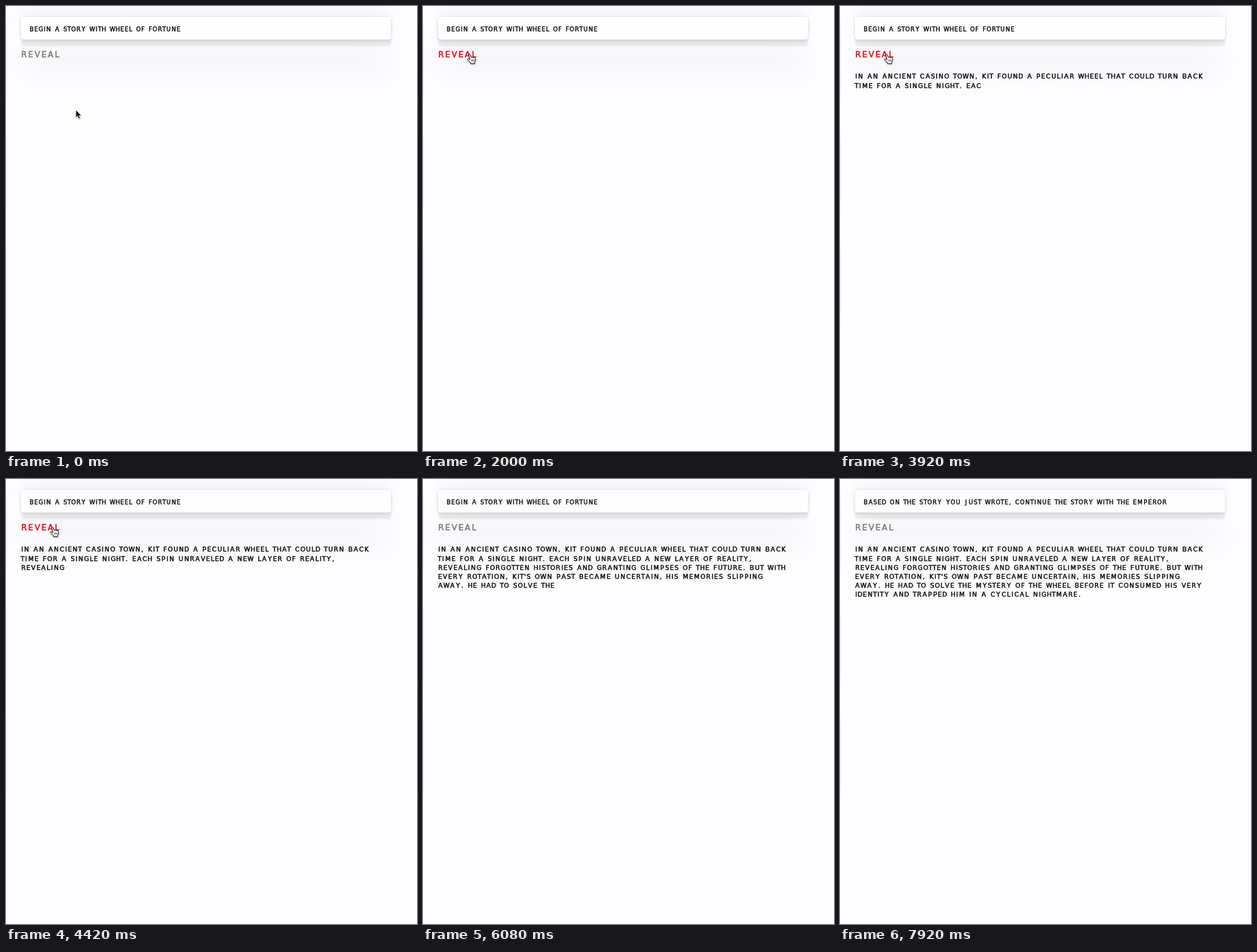
Write an HTML page that moves like this. It is 600x651 px and loops after 8000 ms.

```html
<!DOCTYPE html>
<html lang="en">
<head>
<meta charset="utf-8">
<title>Story card</title>
<style>
  html, body { margin: 0; width: 100%; height: 100%; overflow: hidden; background: #fefdff; }
  #stage { position: absolute; left: 0; top: 0; width: 600px; height: 651px; overflow: hidden; background: #fefdff; }
  .edge { position: absolute; left: 0; width: 2px; background: linear-gradient(transparent, rgba(0,0,0,.035) 25%, rgba(0,0,0,.035) 75%, transparent); }
  #card {
    position: absolute; left: 22px; top: 16px; width: 540px; height: 33px;
    border-radius: 4px; background: #fffeff;
    box-shadow: 0 0 4px rgba(0,0,0,.1), 0 4px 6px rgba(0,0,0,.06), 0 10px 2px rgba(0,0,0,.06),
      0 -12px 30px rgba(0,0,0,.05), 0 46px 50px rgba(0,0,0,.06);
  }
  svg { position: absolute; left: 0; top: 0; }
  text { font-family: "DejaVu Sans", sans-serif; text-anchor: middle; fill: currentColor; stroke: currentColor; color: #0a0a0a; }
</style>
</head>
<body>
<div id="stage">
  <div class="edge" style="top:0;height:155px"></div>
  <div class="edge" style="top:170px;height:145px"></div>
  <div class="edge" style="top:325px;height:155px"></div>
  <div id="card"></div>
  <svg id="art" width="600" height="651" viewBox="0 0 600 651">
    <g id="cursor" stroke-linejoin="round" style="filter:drop-shadow(0 1px 1px rgba(0,0,0,.3))">
      <path id="arrow" d="M0 0V11.2L2.5 8.9L4.3 13L6.3 12.1L4.6 8.2H8Z" fill="#000" stroke="#fff" stroke-width=".8"/>
      <g id="hand" fill="#fff" stroke="#111" stroke-width="1">
        <path d="M-1.2 .6C-1 -.7 .8 -.8 1.2 .5L2.4 4.4C3 3.5 4.4 3.6 4.8 4.6C5.5 3.9 6.7 4.2 7 5.1C8 4.6 8.8 5.3 8.8 6.4C8.8 9 8.3 10.2 7.4 11.4V13.3H1.6V11.9L-2.8 7.8C-3.5 6.9 -2.4 5.9 -1.4 6.4L.5 7.6Z"/>
        <path d="M2.9 7.2V10.4M4.7 7.2V10.4M6.5 7.2V10.4" stroke-width=".7"/>
      </g>
    </g>
  </svg>
</div>
<script>
const LOOP = 8000, FRAME = 1000 / 12, WRAP = 514.5, LINE = 13.2, LINES = 6;
const PROMPTS = [
  "BEGIN A STORY WITH WHEEL OF FORTUNE",
  "BASED ON THE STORY YOU JUST WROTE, CONTINUE THE STORY WITH THE EMPEROR"
];
const STORY = "IN AN ANCIENT CASINO TOWN, KIT FOUND A PECULIAR WHEEL THAT COULD TURN BACK " +
  "TIME FOR A SINGLE NIGHT. EACH SPIN UNRAVELED A NEW LAYER OF REALITY, " +
  "REVEALING FORGOTTEN HISTORIES AND GRANTING GLIMPSES OF THE FUTURE. BUT WITH " +
  "EVERY ROTATION, KIT'S OWN PAST BECAME UNCERTAIN, HIS MEMORIES SLIPPING " +
  "AWAY. HE HAD TO SOLVE THE MYSTERY OF THE WHEEL BEFORE IT CONSUMED HIS VERY " +
  "IDENTITY AND TRAPPED HIM IN A CYCLICAL NIGHTMARE.";

// Keys: time, then values.
const TYPED = [[2890, 0], [5170, 228.3], [6080, 317], [7080, 415.2]];
const PATH = [[80, 102, 152], [250, 107, 149], [420, 97, 110], [580, 76, 66], [700, 69, 56], [830, 68, 71],
  [4500, 68, 71], [4670, 52, 90], [5000, 10, 137], [5170, 4, 140]];
const HOVER = [[580, 0], [830, 1], [4580, 1], [4830, 0]];

// Letter advances at story size.
const ADVANCE = { " ": 5.2, "'": 3.5, ",": 4.6, ".": 5, I: 4.2, T: 5.8, L: 6.3, F: 6.5, E: 6.75, S: 7, J: 7,
  D: 7.2, H: 7.3, B: 7.4, P: 7.4, K: 7.5, R: 7.7, N: 8.5, W: 9.5, M: 9.8 };
const advance = c => ADVANCE[c] || 8;
const width = s => [...s].reduce((sum, c) => sum + advance(c), 0);

const $ = id => document.getElementById(id);
const art = $("art"), cursor = $("cursor");

function label(x, y, scale, size, weight) {
  const el = document.createElementNS("http://www.w3.org/2000/svg", "text");
  el.setAttribute("y", y);
  el.setAttribute("font-size", size);
  el.setAttribute("stroke-width", weight);
  art.insertBefore(el, cursor);
  let shown = "";
  return {
    el,
    set(s) {
      if (s === shown) return;
      shown = s;
      let pos = x;
      el.setAttribute("x", [...s].map(c => {
        const mid = pos + (advance(c) - 1) * scale / 2;
        pos += advance(c) * scale;
        return mid.toFixed(2);
      }).join(" "));
      el.textContent = s;
    }
  };
}

function at(keys, t) {
  if (t <= keys[0][0]) return keys[0].slice(1);
  for (let i = 1; i < keys.length; i++) {
    const a = keys[i - 1], b = keys[i];
    if (t <= b[0]) {
      const p = (t - a[0]) / (b[0] - a[0]);
      return a.slice(1).map((v, j) => v + (b[j + 1] - v) * p);
    }
  }
  return keys[keys.length - 1].slice(1);
}

function wrap(s) {
  const lines = [""];
  for (const word of s.split(" ")) {
    const last = lines[lines.length - 1];
    const joined = last ? last + " " + word : word;
    if (width(joined) > WRAP) lines.push(word);
    else lines[lines.length - 1] = joined;
  }
  return lines;
}

const prompt = label(34.5, 36.5, .922, 8.5, .4);
const reveal = label(22, 75.1, 1.32, 11.8, .4);
const rows = Array.from({ length: LINES }, (_, i) => label(22, 106.4 + i * LINE, 1, 9.2, .45));
reveal.set("REVEAL");

function draw(t) {
  prompt.set(PROMPTS[t >= 7830 ? 1 : 0]);

  const lines = wrap(STORY.slice(0, Math.floor(at(TYPED, t)[0])));
  rows.forEach((row, i) => row.set(lines[i] || ""));

  const [h] = at(HOVER, t);
  const mix = (a, b) => Math.round(a + (b - a) * h);
  reveal.el.style.color = `rgb(${mix(118, 232)},${mix(118, 0)},${mix(118, 12)})`;

  const [x, y] = at(PATH, t);
  const over = t >= 580 && t < 4600;
  cursor.setAttribute("transform", `translate(${x.toFixed(2)} ${y.toFixed(2)})`);
  cursor.style.display = t < 5250 ? "" : "none";
  $("hand").style.display = over ? "" : "none";
  $("arrow").style.display = over ? "none" : "";
}

function tick() {
  const step = Math.floor((performance.now() % LOOP + 4) / FRAME) % 96;
  draw(Math.round(step * FRAME / 10) * 10);
  requestAnimationFrame(tick);
}
tick();
</script>
</body>
</html>
```
